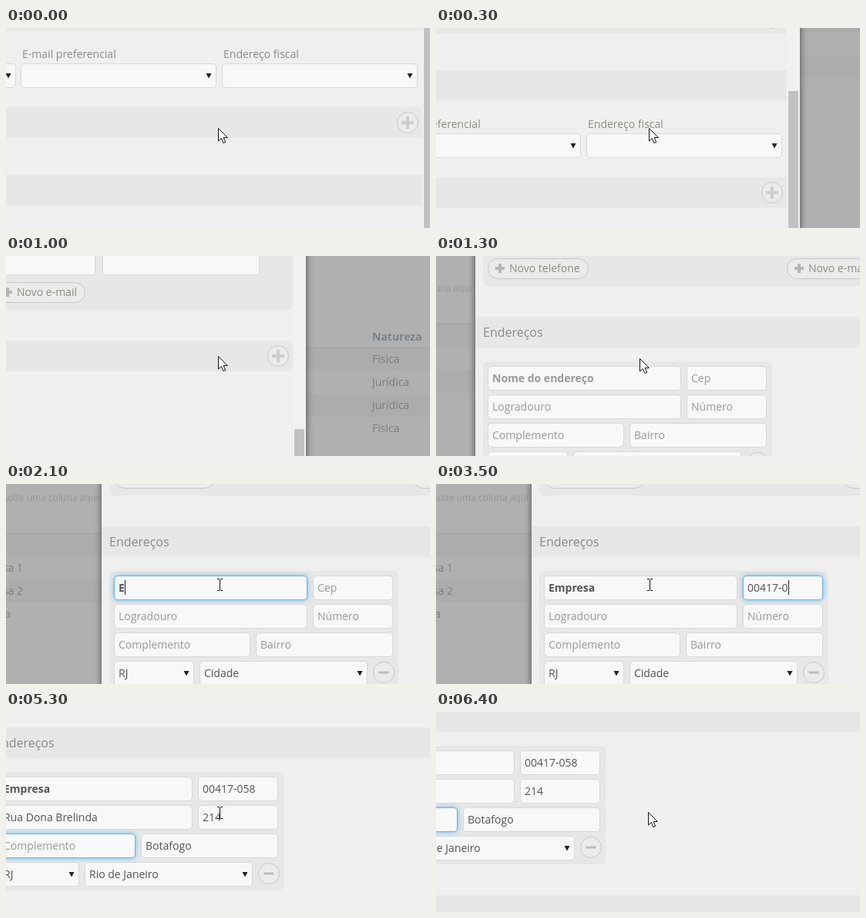
An HTML page that plays this animation: 550 px wide and 260 px high, repeating every 6.5 s.

```html
<!DOCTYPE html>
<html lang="pt-BR">
<head>
<meta charset="utf-8">
<title>Cadastro de endereço</title>
<style>
  html, body { margin: 0; width: 100%; height: 100%; overflow: hidden; background: #b0b0b0; }
  svg { display: block; width: 550px; height: 260px; }
  text { font: 14px "Open Sans", sans-serif; fill: #555; }
  .title { font-size: 16px; fill: #8a8a8a; }
  .label { fill: #8c8c86; }
  .bold { font-weight: bold; }
  .hint { fill: #999; }
  .back { fill: #7e7e7e; }
  .head { fill: #7b8288; font-weight: bold; }
  .drop { fill: #969696; font-size: 12px; }
  .box { fill: #f8f8f8; stroke: #d8d8d8; }
  .focus { stroke: #66b3e6; filter: drop-shadow(0 0 3px #6bb8ee); }
  .panel { fill: #efefef; filter: drop-shadow(0 0 5px rgba(0,0,0,.6)); }
  .band { fill: #e7e7e7; }
  .round { fill: #ebebeb; stroke: #c8c8c8; }
</style>
</head>
<body>
<svg id="stage" viewBox="0 0 550 260"></svg>
<script>
const LOOP = 6500, STEP = 100, ADDED_AT = 900, ADDED_HEIGHT = 164;
const LEFT = -250, RIGHT = 557, INNER = -240, EDGE = 540;

// Camera path: time, x, y
const PATH = [
  [0, 0, 0], [600, -206, 211], [800, -242, 237], [900, -242, 237],
  [1300, 301, 203], [1500, 374, 179], [3800, 374, 179], [4100, 225, 144],
  [6200, 225, 144], [6300, 191, 143], [6400, 85, 110]
];
// Arrow tip: time, x, y
const POINTER = [[0, 275, 130], [600, 277, 129], [900, 277, 129], [1300, 264, 133], [1400, 275, 130]];

const rect = (x, y, w, h, cls, r = 0) =>
  `<rect x="${x}" y="${y}" width="${w}" height="${h}" rx="${r}" class="${cls}"/>`;
const text = (x, y, s, cls = '', anchor = 'start') =>
  `<text x="${x}" y="${y}" class="${cls}" text-anchor="${anchor}">${s}</text>`;
const band = (y, title = '') =>
  rect(LEFT, y, EDGE - LEFT, 40, 'band') + text(INNER, y + 26, title, 'title');
const box = (x, y, w) => rect(x + .5, y + .5, w - 1, 31, 'box', 4.5);
const arrow = (x, y) => `<path d="M${x - 3.5} ${y - 3}h7l-3.5 6.5z" fill="#222"/>`;
const select = (x, y, w) => box(x, y, w) + arrow(x + w - 10, y + 16);
const field = (id, x, y, w, isSelect) =>
  `<g id="${id}">${isSelect ? select(x, y, w) : box(x, y, w)}${text(x + 6, y + 21, '')}</g>`;
const disc = (x, y, icon) =>
  `<circle cx="${x}" cy="${y}" r="13.5" class="round"/><path d="${icon}" transform="translate(${x} ${y})"`;
const plusButton = (x, y) => disc(x, y, 'M-8 0H8M0-8V8') + ' stroke="#cdcdcd" stroke-width="4"/>';
const minusButton = (x, y) => disc(x, y, 'M-6.5 0H6.5') + ' stroke="#bcbcbc" stroke-width="3"/>';
const pill = (x, w, label) =>
  rect(x + .5, -199.5, w - 1, 26, 'round', 13) +
  `<path d="M${x + 10} -187h12m-6-6v12" stroke="#b4b4b4" stroke-width="4"/>` +
  text(x + 28, -182, label, 'label');

function backPage() {
  const kinds = ['Física', 'Jurídica', 'Jurídica', 'Física'];
  const names = ['', 'Empresa 1', 'Empresa 2', 'Empresa'];
  const ends = [0, -352, -352, -368];
  let s = text(-254, -157, 'solte uma coluna aqui', 'drop', 'end') + text(643, -124, 'Natureza', 'head');
  kinds.forEach((kind, i) => {
    const y = -115 + 30 * i;
    if (i % 2 === 0) s += `<rect x="-900" y="${y}" width="2200" height="30" fill="#acacac"/>`;
    s += text(643, y + 20, kind, 'back') + text(ends[i], y + 20, names[i], 'back', 'end');
  });
  return s + '<path d="M-900 -114.5H1300" stroke="#a2a2a2"/>';
}

function contacts() {
  return rect(INNER, -400, EDGE - INNER, 236, 'band', 6) +
    box(-234, -241, 130) + box(-95, -241, 204) + box(154, -241, 130) + box(293, -241, 204) +
    pill(-234, 131, 'Novo telefone') + pill(154, 117, 'Novo e-mail');
}

function addressForm() {
  return rect(INNER, -66, 375, 154, 'band', 6) +
    field('name', -234, -60, 251) + field('cep', 24, -60, 104) +
    field('street', -234, -23, 251) + field('number', 24, -23, 104) +
    field('extra', -234, 14, 177) + field('district', -50, 14, 178) +
    field('state', -234, 51, 104, true) + field('city', -123, 51, 218, true) +
    minusButton(116, 66);
}

function lowerSections() {
  return band(-36, 'Preferências') +
    [['Telefone preferencial', -241], ['E-mail preferencial', 19], ['Endereço fiscal', 280]]
      .map(([label, x]) => text(x + 2, 39, label, 'label') + select(x, 46, 254)).join('') +
    band(103) + plusButton(521, 123) + band(191);
}

document.getElementById('stage').innerHTML = `
  <rect width="550" height="260" fill="#b0b0b0"/>
  <g id="world">
    ${backPage()}
    ${rect(LEFT, -600, RIGHT - LEFT, 1500, 'panel')}
    <rect x="${EDGE}" y="-600" width="17" height="1500" fill="#f1f1f1"/>
    <rect x="542" y="-9" width="13" height="480" fill="#c1c1c1"/>
    ${contacts()}
    ${band(-124, 'Endereços')}${plusButton(521, -104)}
    <g id="lower">${lowerSections()}</g>
    <g id="form">${addressForm()}</g>
    <path id="caret" stroke="#222"/>
  </g>
  <path id="pointer" d="M0 0V16.5L3.8 13L6.4 19L9.2 17.8L6.6 12H11.8Z" fill="#fff" stroke="#111"/>
  <path id="beam" d="M274 123.5h2.5l1 1l1-1h2.5M277.5 124v14M274 138.5h2.5l1-1l1 1h2.5" fill="none" stroke="#111"/>`;

const $ = id => document.getElementById(id);
const place = (el, x, y) => el.setAttribute('transform', `translate(${x} ${y})`);
const show = (el, on) => el.setAttribute('visibility', on ? 'visible' : 'hidden');

// Smooth interpolation that never overshoots its keys
function follow(keys, t, col) {
  const last = keys.length - 1;
  if (t >= keys[last][0]) return keys[last][col];
  const i = keys.findIndex(k => k[0] > t) - 1;
  const slope = j => j < 0 || j >= last ? 0 :
    (keys[j + 1][col] - keys[j][col]) / (keys[j + 1][0] - keys[j][0]);
  const tangent = j => {
    const a = slope(j - 1), b = slope(j);
    return a * b <= 0 ? 0 : 2 * a * b / (a + b);
  };
  const [p, q] = [keys[i], keys[i + 1]], d = q[0] - p[0], u = (t - p[0]) / d;
  const ease = u * u * (3 - 2 * u);
  return p[col] + (q[col] - p[col]) * ease +
    d * u * (1 - u) * (tangent(i) * (1 - u) - tangent(i + 1) * u);
}

const typed = (s, t, start, pace) =>
  s.slice(0, Math.max(0, Math.floor((t - start) / pace)));

function fill(id, value, hint, cls = '') {
  const el = $(id).querySelector('text');
  el.textContent = value || hint;
  el.setAttribute('class', (value ? '' : 'hint ') + cls);
}

function focusAt(t) {
  if (t < 1800) return ['', 0];
  if (t < 2800) return ['name', Math.max(1800, Math.min(t, 2700))];
  if (t < 4300) return ['cep', Math.min(t, 3600)];
  if (t < 5100) return ['number', Math.min(t, 4900)];
  return ['extra', Math.min(t, 5900)];
}

function draw(t) {
  place($('world'), Math.round(follow(PATH, t, 1)), Math.round(follow(PATH, t, 2)));

  const added = t >= ADDED_AT, found = t >= 3800;
  show($('form'), added);
  place($('lower'), 0, added ? ADDED_HEIGHT : 0);

  const values = {
    name: typed('Empresa', t, 2000, 100),
    cep: typed('00417-058', t, 2880, 80),
    number: typed('214', t, 4450, 150),
    extra: typed('Sala 3', t, 5300, 100)
  };
  fill('name', values.name, 'Nome do endereço', 'bold');
  fill('cep', values.cep, 'Cep');
  fill('street', found && 'Rua Dona Brelinda', 'Logradouro');
  fill('number', values.number, 'Número');
  fill('extra', values.extra, 'Complemento');
  fill('district', found && 'Botafogo', 'Bairro');
  fill('state', 'RJ');
  fill('city', found ? 'Rio de Janeiro' : 'Cidade');

  const [focus, lastKey] = focusAt(t);
  for (const id in values)
    $(id).querySelector('rect').setAttribute('class', id === focus ? 'box focus' : 'box');

  const blinkOn = focus && (t - lastKey) % 1000 < 500;
  show($('caret'), blinkOn);
  if (blinkOn) {
    const el = $(focus).querySelector('text');
    const width = values[focus] ? el.getComputedTextLength() : 0;
    const x = Math.round(+el.getAttribute('x') + width) + .5;
    $('caret').setAttribute('d', `M${x} ${+el.getAttribute('y') - 15}v19`);
  }

  const overField = t >= 1400 && t < 6400;
  show($('beam'), overField);
  show($('pointer'), !overField);
  place($('pointer'), Math.round(follow(POINTER, t, 1)) + .5, Math.round(follow(POINTER, t, 2)) + .5);
}

const start = performance.now();
function tick() {
  const t = (performance.now() - start) % LOOP;
  draw(Math.floor(t / STEP) * STEP);
  requestAnimationFrame(tick);
}
tick();
</script>
</body>
</html>
```
